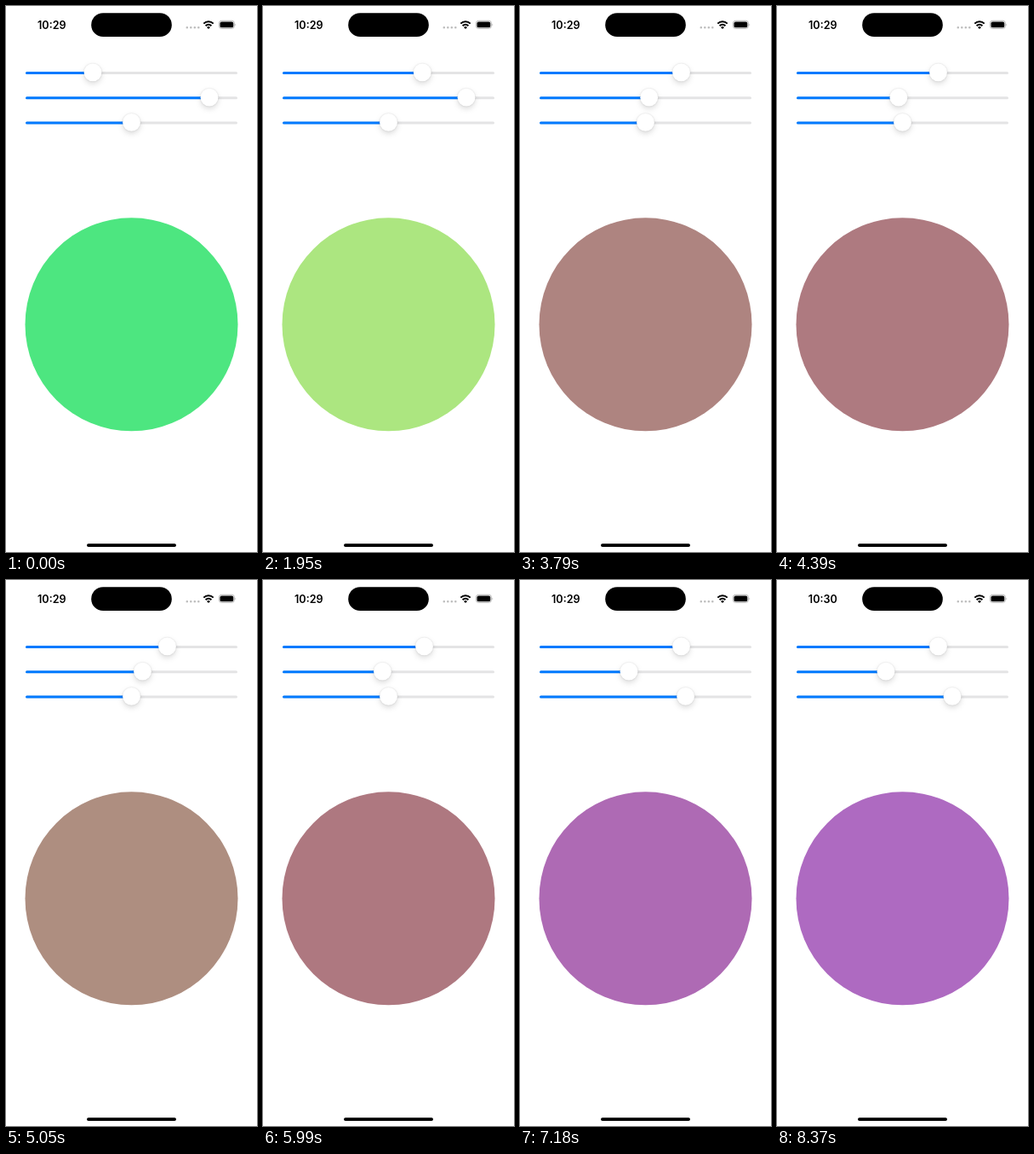
An HTML page for the animation above (8470 ms loop, 295 by 640 pixels).

```html
<!DOCTYPE html>
<html lang="en">
<head>
<meta charset="utf-8">
<title>Colour mixer</title>
<style>
  html, body { margin: 0; width: 100%; height: 100%; overflow: hidden; background: #fff; }
  svg { display: block; }
  #clock { font: 600 12.6px Inter, sans-serif; text-anchor: middle; }
  .track, .fill { stroke-width: 3; stroke-linecap: round; }
  .track { stroke: #e4e4e5; }
  .fill { stroke: #007aff; }
  .thumb { fill: #fff; filter: drop-shadow(0 .4px 1px #0002) drop-shadow(0 3.5px 3px #0002); }
</style>
</head>
<body>
<svg width="295" height="640" viewBox="0 0 295 640">
  <text id="clock" x="53.8" y="26.7">10:29</text>
  <rect x="100.2" y="8.3" width="94.6" height="27.8" rx="13.9"/>
  <path d="M212.8 25.3h14" stroke="#bdbdbd" stroke-width="2.6" stroke-linecap="round" stroke-dasharray="0 4.5"/>
  <g fill="none" stroke="#000" stroke-width="2">
    <path d="M232.3 20.6a8 8 0 0 1 11.4 0"/>
    <path d="M234.6 23.2a4.8 4.8 0 0 1 6.8 0"/>
  </g>
  <path d="M238 27l-2-2a2.9 2.9 0 0 1 4 0z"/>
  <rect x="250.4" y="17.3" width="18" height="9.1" rx="2.9" fill="none" stroke="#a5a5a5" stroke-width=".8"/>
  <rect x="251.5" y="18.5" width="15.8" height="6.8" rx="1.9"/>
  <path d="M269.5 20.4q1.5 1.5 0 3z" fill="#a5a5a5"/>
  <g id="sliders"></g>
  <circle id="disc" cx="147.5" cy="373.3" r="125"/>
  <rect x="95" y="630.2" width="105" height="3.8" rx="1.9"/>
</svg>
<script>
const LOOP = 8470, MINUTE_CHANGE = 8370;

// Red, green and blue: where each thumb starts and how it is dragged.
const channels = [
  { x: 102, drags: [{ start: 1300, end: 2020, to: 189.5 }] },
  { x: 239, drags: [
    { start: 2580, end: 2780, to: 200 },
    { start: 3480, end: 3900, to: 142 },
    { start: 4290, end: 5050, to: 160.5 },
    { start: 5800, end: 6130, to: 128 }
  ] },
  { x: 147.5, drags: [
    { start: 6330, end: 7000, to: 194 },
    { start: 7130, end: 7500, to: 206 }
  ] }
];

const ease = (t, start, end) => {
  const p = Math.min(1, Math.max(0, (t - start) / (end - start)));
  return p * p * (3 - 2 * p);
};
const thumbX = ({ x, drags }, t) =>
  drags.reduce((from, { start, end, to }) => from + (to - from) * ease(t, start, end), x);

const sliders = document.getElementById("sliders");
const disc = document.getElementById("disc");
const clock = document.getElementById("clock");

sliders.innerHTML = channels.map((_, i) => {
  const y = 78.5 + 29.25 * i;
  return `
    <line class="track" x1="24.5" x2="270.5" y1="${y}" y2="${y}"/>
    <line class="fill" x1="24.5" y1="${y}" y2="${y}"/>
    <circle class="thumb" cy="${y - 0.6}" r="10.4"/>`;
}).join("");
const fills = sliders.querySelectorAll(".fill");
const thumbs = sliders.querySelectorAll(".thumb");

function frame() {
  const t = performance.now() % LOOP;
  const rgb = channels.map((channel, i) => {
    const x = thumbX(channel, t);
    fills[i].setAttribute("x2", x);
    thumbs[i].setAttribute("cx", x);
    return Math.round((x - 33.3) / 228.4 * 255);
  });
  disc.setAttribute("fill", `rgb(${rgb})`);
  clock.textContent = t < MINUTE_CHANGE ? "10:29" : "10:30";
  requestAnimationFrame(frame);
}
frame();
</script>
</body>
</html>
```
